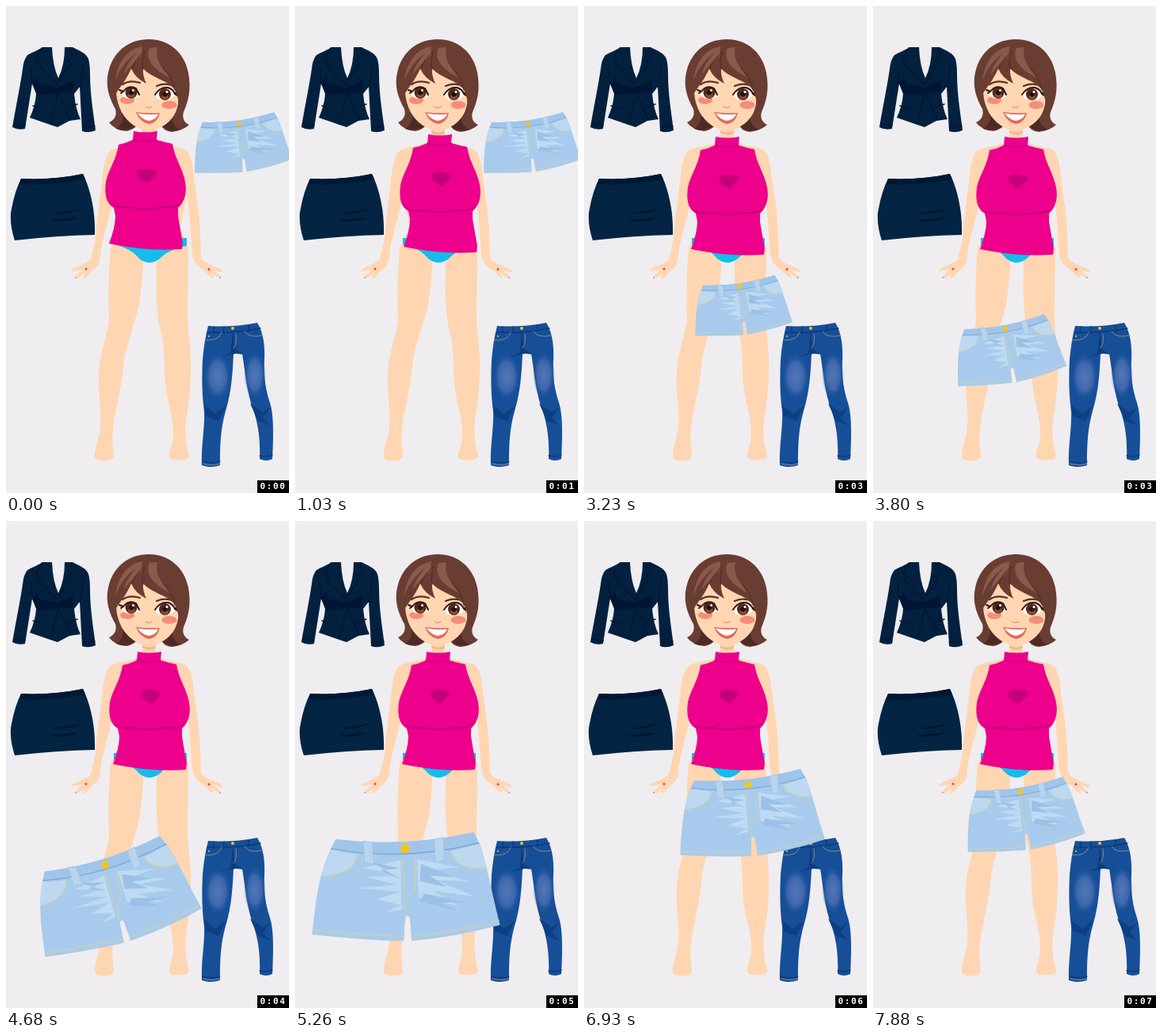
An HTML page for the animation above (8 s loop, 357 by 615 pixels).

```html
<!DOCTYPE html>
<html lang="en">
<head>
<meta charset="utf-8">
<title>Dress-up doll</title>
<style>
html, body { margin: 0; width: 100%; height: 100%; overflow: hidden; background: #efedef; }
svg { display: block; width: 357px; height: 615px; }
.clock { font: bold 11px "DejaVu Sans Mono", monospace; letter-spacing: 1.6px; fill: #fff; }
.stitch { fill: none; stroke: #c8cfb4; stroke-width: 1.7; }
.line { fill: none; stroke-linecap: round; stroke-linejoin: round; }
</style>
</head>
<body>
<svg viewBox="0 0 357 615">
  <defs>
    <radialGradient id="fade">
      <stop offset="0" stop-color="#5378b8"/>
      <stop offset=".6" stop-color="#456cb0" stop-opacity=".85"/>
      <stop offset="1" stop-color="#17509a" stop-opacity="0"/>
    </radialGradient>
  </defs>
  <rect width="357" height="615" fill="#efedef"/>

  <!-- body -->
  <g fill="#ffd6b1">
    <path d="M172 148V170C162 177 146 176 133 182C124 188 123 206 121 222C118 248 114 272 113 294L107 320C102 325 92 328 83 333Q81 336 89 334L97 333L89 340Q87 345 92 343L100 337L97 342Q97 345 101 343L108 335C116 330 119 324 119 314C121 296 129 272 137 238L145 280L132 306C129 340 129 370 130 398C126 422 118 438 117 466C116 494 121 510 119 532C117 550 111 560 112 570Q114 575 125 574Q136 575 136 566C133 548 134 534 138 514C143 490 147 470 149 446C153 424 163 400 168 376C171 356 173 340 173 318H190V340C189 360 190 382 193 402C199 424 200 440 200 460C200 490 210 514 211 536C212 552 205 562 206 570Q209 575 219 573Q231 574 231 568C228 556 225 542 227 522C231 500 233 482 233 458C234 430 229 412 229 390L230 306L220 280L228 238C233 268 233 292 235 312Q236 326 250 334L257 341Q261 345 262 342L258 336L266 342Q271 345 270 341L262 334L272 336Q276 335 268 331C258 327 250 324 246 318L245 288C244 262 240 238 237 216C235 196 233 186 225 181C212 176 196 177 189 169V148Z"/>
  </g>
  <path d="M172 157Q181 162 189 157L188 161Q181 165 172 160Z" fill="#f4b68f"/>
  <g fill="#e5405a">
    <circle cx="101" cy="332" r="1.5"/><circle cx="88" cy="343" r=".8"/>
    <circle cx="256" cy="332.5" r="1.5"/><circle cx="270" cy="343" r=".8"/>
  </g>
  <path d="M136 293H228V303Q204 308 194 319Q181 329 168 319Q158 306 136 301Z" fill="#12bdec"/>

  <!-- head -->
  <path d="M180 42C156 42 137 56 130 80C124 101 131 117 138 130Q141 142 130 147Q137 157 152 158Q162 156 168 148H194Q198 158 209 159Q224 157 231 150Q221 145 224 134C230 120 234 106 230 84C225 59 206 42 180 42Z" fill="#693d32"/>
  <path d="M146 132Q151 147 139 155Q154 161 168 148L158 138ZM210 134Q207 150 220 156Q204 162 194 148L202 138Z" fill="#4d2a25"/>
  <path d="M141 86C136 108 140 126 149 139C158 151 170 157 180 158C192 157 205 149 212 138C219 126 220 107 216 89L190 65H161Z" fill="#ffd6b1"/>
  <g fill="#f58d79">
    <ellipse cx="153" cy="119" rx="9" ry="5"/><ellipse cx="206" cy="125" rx="9.5" ry="5"/>
  </g>
  <g fill="#fff">
    <path d="M146 109Q151 101 161 103Q167 106 168 114Q158 120 149 115Z"/>
    <path d="M188 113Q193 104 204 104Q212 107 213 113Q207 121 193 118Z"/>
  </g>
  <g fill="#54281d">
    <circle cx="158" cy="109.5" r="7.5"/><circle cx="200.500" cy="111.5" r="7.5"/>
  </g>
  <g fill="#8a4d2c">
    <ellipse cx="158" cy="113" rx="4.5" ry="3"/><ellipse cx="200.500" cy="115" rx="4.5" ry="3"/>
  </g>
  <g fill="#21110f">
    <circle cx="158" cy="109.5" r="3"/><circle cx="200.500" cy="111.5" r="3"/>
  </g>
  <g fill="#fff">
    <circle cx="160.500" cy="106.5" r="1.5"/><circle cx="203" cy="108.5" r="1.5"/>
  </g>
  <path d="M143 106L148 108Q155 99 164 104L168 112M145 110L148 108M188 112Q194 102 204 103Q211 105 213 111L217 109M213 111L216 113" class="line" stroke="#2c1613" stroke-width="2"/>
  <path d="M147 99Q156 93 169 97M190 101Q203 96 213 102" class="line" stroke="#593026" stroke-width="2.2"/>
  <path d="M176 127Q180 130 184 127" class="line" stroke="#e79d7c" stroke-width="1.3"/>
  <path d="M164 134Q179 136 194 135Q191 148 180 149Q169 147 164 134Z" fill="#e2695c"/>
  <path d="M166 135.500Q180 138 192 136.500Q189 144 180 145Q171 143 166 135.500Z" fill="#fff"/>
  <path d="M136 121C137 106 147 104 158 79Q163 91 177 98Q172 87 173 79C185 92 206 94 213 106Q219 116 217 132L225 124L228 86L209 54L180 44L150 53L132 80Z" fill="#693d32"/>
  <path d="M172 51C151 55 141 72 138 94C145 76 154 67 165 59C154 71 150 79 149 86C159 73 166 67 171 63ZM181 53C174 70 190 82 207 91C193 74 188 65 191 52Z" fill="#8a594c"/>
  <path d="M159 79Q162 68 174 58M173 80Q170 70 175 58M213 106Q211 91 198 78" class="line" stroke="#4d2a25"/>

  <!-- jacket -->
  <path d="M46 52H58Q59 76 66 91Q74 75 74 52H84C93 57 101 59 104 67Q106 74 106 86C106 110 110 134 113 157Q104 161 96 158L93 102L86 111Q88 131 94 143L80 145L65 153L56 150L30 141Q37 126 38 111L33 98L24 155Q15 157 8 153C13 125 18 100 21 80Q22 68 27 62C33 58 39 57 46 52Z" fill="#03213f"/>
  <path d="M33 98L39 90L42 98L64 103L86 94L84 109L66 110L40 113Z" fill="#001534"/>
  <path d="M45 53L37 67L43 70L39 73L64 99L82 72L78 69L84 65L82 53M31 77L33 98M98 73L93 102M66 109L56 149M66 109L81 144M34 126L49 130M77 128L90 124M10 149L24 151M97 153L112 152" class="line" stroke="#001633" stroke-width="1.4"/>

  <!-- skirt -->
  <path d="M19 218Q59 220 97 212C105 228 113 255 112 289Q63 290 11 296Q5 278 6 262Q10 236 19 218Z" fill="#032442"/>
  <path d="M19 218Q59 220 97 212L100 219Q59 227 17 225Z" fill="#001834"/>
  <path d="M62 262Q78 262 91 257Q77 260 62 262ZM57 271Q75 273 89 268L74 269Z" fill="#001330" stroke="#001330"/>

  <!-- jeans -->
  <path d="M255 404Q286 406 317 400C323 410 327 424 326 446C325 466 327 482 332 498C337 512 338 530 336 572Q328 576 320 572C321 546 318 528 312 510C304 490 302 464 298 439H287C286 464 284 488 278 508C271 532 270 550 270 580Q258 584 247 580C246 556 251 532 250 512C247 490 247 470 248 447Q250 423 255 404Z" fill="#164f98"/>
  <ellipse cx="267" cy="468" rx="17" ry="30" fill="url(#fade)"/>
  <ellipse cx="314" cy="466" rx="14" ry="30" fill="url(#fade)"/>
  <path d="M250 504L264 515L278 504L268 524L252 518ZM308 502L324 513L334 506L324 520L334 530L318 524ZM286 416L283 438L272 443L290 439L300 440L289 433Z" fill="#0d3f82"/>
  <path d="M254 412Q286 414 321 407M286 414L287 438M248 575Q260 579 270 575M320 568Q330 570 336 567M262 405V413M275 405V414M306 403V411" class="line" stroke="#0b3977" stroke-width="1.3"/>
  <path d="M252 422Q269 423 272 412M301 411Q306 420 324 416M290 414Q292 426 287 432M249 578Q260 581 270 578" class="line" stroke="#a69b76" stroke-width=".8"/>
  <circle cx="286" cy="407" r="2" fill="#edc32a"/><circle cx="256" cy="417" r="1" fill="#dec77c"/>

  <g id="top">
    <path d="M166 165Q181 168 196 165L195 176Q205 179 215 181C218 200 228 212 231 229C234 245 229 256 222 262V272Q225 290 228 306L227 314Q181 317 135 307Q143 286 143 272L141 262C131 256 129 245 131 229C134 214 144 202 147 182Q157 180 165 176Z" fill="#ec008c"/>
    <path d="M136 256Q145 262 162 260Q181 265 202 260Q219 261 227 255Q218 264 202 262Q181 267 162 262Q145 265 136 256ZM171 215Q180 211 187 214Q194 213 196 219L183 231L171 222Z" fill="#c60078"/>
    <path d="M165 176Q181 180 195 176" class="line" stroke="#c60078" stroke-width="1.2"/>
  </g>

  <g id="shorts">
    <path d="M-88 -14Q0 -1 88 -19L96 -3C104 24 111 66 119 100Q65 114 6 118L4 88Q1 83 -2 88L-4 118Q-62 115 -121 107C-116 70 -112 33 -95 -1Z" fill="#a8cbed"/>
    <path d="M-88 -14Q0 -1 88 -19L94 -5Q0 17 -94 -2Z" fill="#9fc5ea"/>
    <path d="M-94 -1Q-78 5 -61 6Q-64 31 -107 33Q-103 12 -94 -1ZM58 5L95 -4L104 27Q67 31 58 5Z" fill="#bed8f0"/>
    <path d="M-53 23L-11 34L-50 35L-10 46L-62 49L-8 55L-38 64L-7 72L-28 81L-6 78V15ZM15 14L68 25L34 28L82 44L39 41L88 63L36 55L67 75L16 62Z" fill="#bfdaf3"/>
    <path d="M-43 16L-7 25L-33 27L-6 39ZM20 20L62 38L31 35L52 50L18 42ZM23 58L77 70L44 70L64 81L18 68Z" fill="#9bc1e6"/>
    <path d="M-94 -2Q0 17 94 -5" class="line" stroke="#7fa9d4" stroke-width="1.5"/>
    <path d="M-4 11L-1 85M13 11L12 46Q10 59 0 63M-61 6Q-64 31 -107 33M58 5Q67 31 104 27M-120 101Q-62 109 -4 112M6 112Q65 108 118 94" class="stitch"/>
    <path d="M-53 -11L-42 -9L-40 19L-52 17ZM37 -11L49 -13L50 16L39 18Z" fill="#b9d4ee" stroke="#a6c4e2"/>
    <circle r="5.8" fill="#f3c51d"/>
  </g>

  <rect x="317" y="599" width="40" height="16" fill="#000"/>
  <text id="clock" class="clock" x="320.500" y="610">0:00</text>
</svg>
<script>
const LOOP = 8000, CLOCK_STEP = 1025;

// time, x, y
const topMoves = [[150, -5, -7], [390, 5, -7], [1540, 0, 0]];

// time, button x, button y, angle, scale
const shortsMoves = [
  [2700, 294, 149, -6.3, .516],
  [3450, 171, 408, -6.3, .516],
  [3800, 167, 408, -9, .58],
  [4250, 125, 434, -15.6, .86],
  [4700, 125, 434, -15.6, .86],
  [5380, 140, 412, 0, 1],
  [5900, 140, 412, 0, 1],
  [6050, 168, 352, 0, 1],
  [6350, 208, 325, 0, 1],
  [6930, 207, 333, -4.6, .765],
  [7880, 186, 342, -7.4, .625]
];

const [blouse, shorts, clock] = ["top", "shorts", "clock"].map(id => document.getElementById(id));
const clamp = v => Math.min(1, Math.max(0, v));
const ease = p => p * p * (3 - 2 * p);

// Eased values between the two moves around time t, held at both ends.
function pose(moves, t) {
  const next = moves.findIndex(m => m[0] > t);
  const end = next < 0 ? moves.length - 1 : Math.max(1, next);
  const [start, ...from] = moves[end - 1];
  const [stop, ...to] = moves[end];
  const p = ease(clamp((t - start) / (stop - start)));
  return from.map((v, i) => v + (to[i] - v) * p);
}

function draw() {
  const t = performance.now() % LOOP;
  const [topX, topY] = pose(topMoves, t);
  const [x, y, angle, scale] = pose(shortsMoves, t);
  blouse.setAttribute("transform", `translate(${topX} ${topY})`);
  shorts.setAttribute("transform", `translate(${x} ${y}) rotate(${angle}) scale(${scale})`);
  clock.textContent = "0:0" + Math.floor(t / CLOCK_STEP);
  requestAnimationFrame(draw);
}
draw();
</script>
</body>
</html>
```
